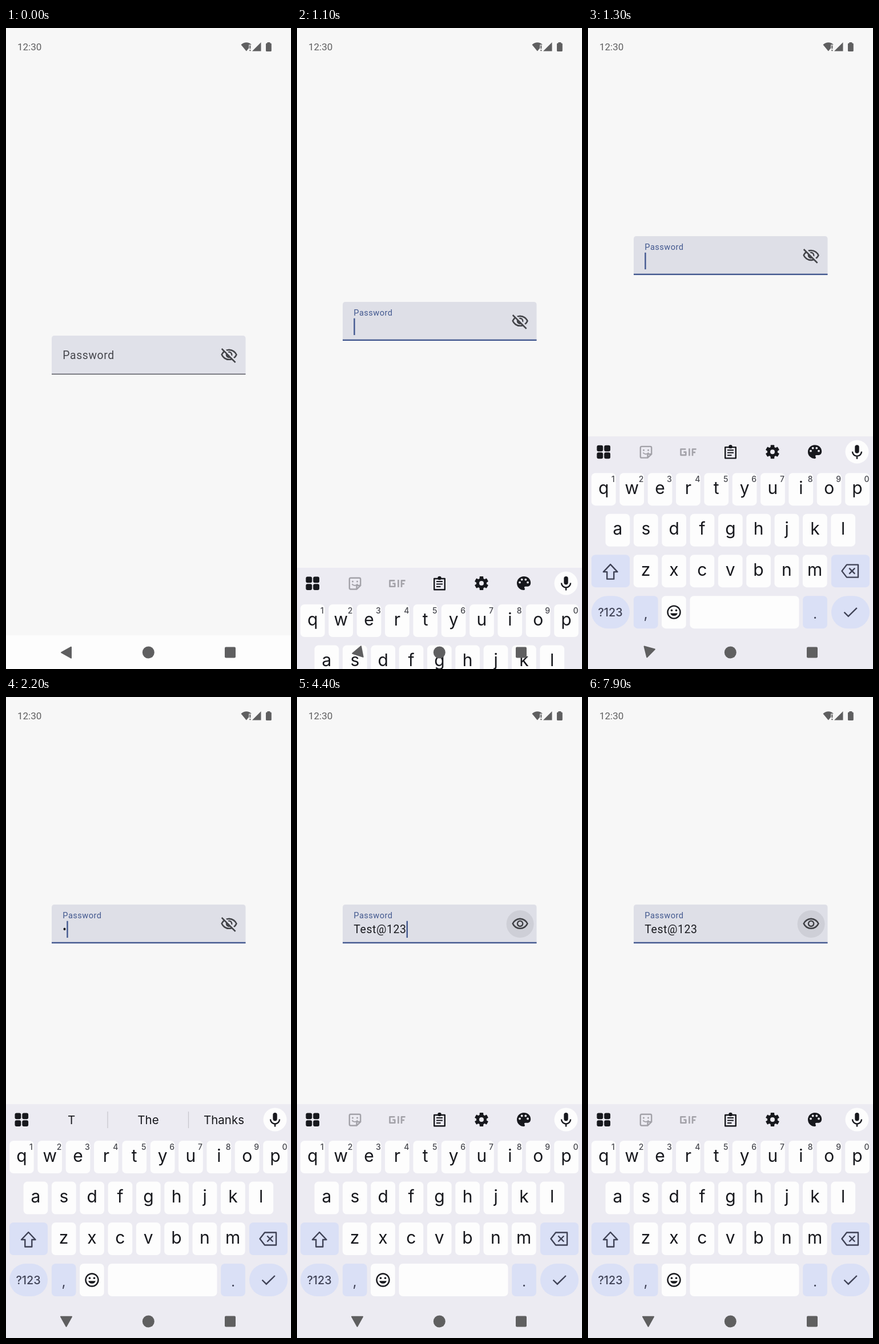
Recreate the animation shown at these times as an HTML page. Size 499 px wide and 1121 px high, loop 8000 ms.

```html
<!DOCTYPE html>
<html lang="en">
<head>
<meta charset="utf-8">
<title>Password field</title>
<style>
html, body { margin: 0; width: 100%; height: 100%; overflow: hidden; background: #f7f7f7; }
svg { display: block; width: 100%; height: 100%; font-family: Roboto, sans-serif; }
.mid { text-anchor: middle; }
.line { fill: none; stroke: currentColor; stroke-width: 2.4; }
.sys { fill: #5f5f60; }
.bg { fill: #ecebf2; }
#keyboard { font-family: Inter, sans-serif; }
#keys text { font-size: 30px; }
#keys .digit { font-size: 14px; font-weight: 500; fill: #45464d; }
</style>
</head>
<body>
<svg viewBox="0 0 499 1121">
  <rect width="499" height="1121" fill="#f7f7f7"/>
  <rect y="1062" width="499" height="59" fill="#fdfdfd"/>

  <g class="sys">
    <text x="20" y="38.5" font-size="17">12:30</text>
    <path d="M411.5 29.3C417 23.8 425 23.8 430 29.3H425.3V35.3L420.8 40.5Z"/>
    <path d="M426.4 30.5h2v5.8h-2zM426.4 38h2v2.2h-2zM431 40.5L446.5 25V40.5Z"/>
    <rect x="455" y="26.5" width="9.8" height="14.5" rx="1.6"/>
    <rect x="457.5" y="25" width="4.8" height="3"/>
  </g>

  <g id="field">
    <path id="box" d="M80 68V5q0-5 5-5H414.5q5 0 5 5V68Z"/>
    <rect id="rule" x="80" width="339.5"/>
    <text id="label" x="99.3">Password</text>
    <text id="value" x="99.3" y="50" font-size="19.4" letter-spacing=".607" fill="#1a1b20"></text>
    <rect id="cursor" y="28.7" width="2.4" height="29.3" fill="#42588f"/>
    <g transform="translate(390.6 34)" fill="#434449">
      <g transform="scale(.0325) translate(-480 480)">
        <path id="eye" fill-rule="evenodd" d="M480-320q75 0 127.5-52.5T660-500q0-75-52.5-127.5T480-680q-75 0-127.5 52.5T300-500q0 75 52.5 127.5T480-320Zm0-72q-45 0-76.5-31.5T372-500q0-45 31.5-76.5T480-608q45 0 76.5 31.5T588-500q0 45-31.5 76.5T480-392Zm0 192q-146 0-266-81.5T40-500q54-137 174-218.5T480-800q146 0 266 81.5T920-500q-54 137-174 218.5T480-200Zm0-80q113 0 207.5-59.5T832-500q-50-101-144.5-160.5T480-720q-113 0-207.5 59.5T128-500q50 101 144.5 160.5T480-280Z"/>
        <path id="eyeOff" d="m644-428-58-58q9-47-27-88t-93-32l-58-58q17-8 34.5-12t37.5-4q75 0 127.5 52.5T660-500q0 20-4 37.5T644-428Zm128 126-58-56q38-29 67.5-63.5T832-500q-50-101-143.5-160.5T480-720q-29 0-57 4t-55 12l-62-62q41-17 84-25.5t90-8.5q151 0 269 83.5T920-500q-23 59-60.5 109.5T772-302Zm20 246L624-222q-35 11-70.5 16.5T480-200q-151 0-269-83.5T40-500q21-53 53-98.5t73-81.5L56-792l56-56 736 736-56 56ZM222-624q-29 26-53 57t-41 67q50 101 143.5 160.5T480-280q20 0 39-2.5t39-5.5l-36-38q-11 3-21 4.5t-21 1.5q-75 0-127.5-52.5T300-500q0-11 1.5-21t4.5-21l-84-82Z"/>
      </g>
      <circle id="ripple" r="24" fill="#000"/>
    </g>
  </g>

  <g id="keyboard" color="#17181d" fill="#17181d">
    <rect class="bg" y="712" width="499" height="420"/>
    <g>
      <rect x="15.5" y="727.5" width="10.8" height="10.8" rx="3"/>
      <rect x="28.3" y="727.5" width="10.8" height="10.8" rx="3"/>
      <rect x="15.5" y="740.2" width="10.8" height="10.8" rx="3"/>
      <rect x="28.3" y="740.2" width="10.8" height="10.8" rx="3"/>
    </g>
    <g id="tools">
      <g color="#a3a2a9" fill="#a3a2a9">
        <path class="line" d="M94 729.7H109q2.2 0 2.2 2.2V743L104.5 749.5H94q-2.2 0-2.2-2.2V732q0-2.3 2.2-2.3ZM111 743h-6.5v6.5"/>
        <path class="line" d="M96.3 740.5q4.8 5 10 0" style="stroke-width:2"/>
        <circle cx="97.5" cy="736" r="1.5"/><circle cx="105.5" cy="736" r="1.5"/>
        <path class="line" style="stroke-width:2.6" stroke-linejoin="round" d="M171.3 734.3h-8.8v10.4h8.8v-5.2h-4M177.4 733v13M183 746V734.3h6.6M183 740h5"/>
      </g>
      <path class="line" d="M240.2 731H258.8V750.2H240.2Z" stroke-linejoin="round"/>
      <path class="line" d="M244 736h11M244 740.5h11M244 745h7.5" style="stroke-width:2"/>
      <circle cx="249.5" cy="730" r="3.2"/>
      <g transform="translate(323 739)">
        <circle r="9"/>
        <g id="teeth"></g>
        <circle class="bg" r="4"/>
      </g>
      <g transform="translate(397 739)">
        <path d="M0-12A12 12 0 0 0 0 12C2 12 2.4 10 1.5 8.7C.3 7 1.2 5.8 3 5.8H6C10 5.8 12.2 3 12.2-1C12-7.5 7-12 0-12Z"/>
        <g class="bg"><circle cx="-7" cy="-1.5" r="1.9"/><circle cx="-3.3" cy="-6.5" r="1.9"/><circle cx="3.3" cy="-6.5" r="1.9"/><circle cx="7" cy="-1.5" r="1.9"/></g>
      </g>
    </g>
    <g id="words" class="mid" font-size="20.5">
      <text x="114.5" y="747"></text><text x="249" y="747"></text><text x="381.5" y="747"></text>
      <path d="M178 725v29M319.5 725v29" stroke="#c6c5cc" stroke-width="1.2"/>
    </g>
    <circle cx="471" cy="739" r="20.5" fill="#fdfdfd"/>
    <rect x="467.3" y="727" width="7.4" height="14.5" rx="3.7"/>
    <path class="line" d="M463 738.5a8 8 0 0 0 16 0M471 746v5.5"/>

    <g id="keys" class="mid"></g>

    <g color="#3f4256" fill="#3f4256">
      <path class="line" d="M39.3 936L51.5 949H45.3V961.5H33.3V949H27Z" stroke-linejoin="round"/>
      <path class="line" d="M453 936.5H473V958.5H453L444.5 947.5ZM457.3 942.5l10 10M467.3 942.5l-10 10" stroke-linejoin="round"/>
      <path class="line" d="M448.5 1019.5l7.3 7.2 15-14.7"/>
      <text class="mid" x="39" y="1027" font-size="19.8" font-weight="500">?123</text>
      <text class="mid" x="101" y="1031" font-size="25">,</text>
      <text class="mid" x="397.5" y="1031" font-size="25">.</text>
    </g>
    <g transform="translate(150.5 1019.5)">
      <circle class="line" r="11"/>
      <circle cx="-4" cy="-3.2" r="1.8"/><circle cx="4" cy="-3.2" r="1.8"/>
      <path d="M-6.3 1.8H6.3A6.5 6 0 0 1-6.3 1.8Z"/>
    </g>
  </g>

  <g class="sys">
    <path id="back" d="M-8.5 0L8.5-9.5V9.5Z" stroke="#5f5f60" stroke-width="2" stroke-linejoin="round"/>
    <circle cx="249.3" cy="1092" r="10.5"/>
    <rect x="383" y="1082.5" width="19" height="19" rx="2"/>
  </g>
</svg>
<script>
const $ = id => document.getElementById(id);
const set = (id, attrs) => { for (const k in attrs) $(id).setAttribute(k, attrs[k]); };
const clamp = v => Math.min(1, Math.max(0, v));
const mix = (a, b, p) => a + (b - a) * p;
const show = (id, on) => { $(id).style.display = on ? '' : 'none'; };

// Keyboard
const PITCH = 49.35, KEY = 42.7, TINT = '#dae0f6';
const cap = (x, y, w = KEY, fill = '#fdfdfd', r = 7) =>
  `<rect x="${x}" y="${y}" width="${w}" height="57" rx="${r}" fill="${fill}"/>`;
let keys = '';
[['qwertyuiop', 6, 776], ['asdfghjkl', 30.6, 847.5], ['zxcvbnm', 79.8, 919]].forEach(([row, x0, y], r) =>
  [...row].forEach((ch, i) => {
    const x = x0 + i * PITCH;
    keys += cap(x, y) + `<text x="${x + KEY / 2}" y="${y + 36.8}">${ch}</text>`;
    if (!r) keys += `<text class="digit" x="${x + 37.8}" y="792">${(i + 1) % 10}</text>`;
  }));
for (const x of [6, 426]) keys += cap(x, 919, 67, TINT) + cap(x, 991, 67, TINT, 28.5);
for (const x of [79.8, 376.2]) keys += cap(x, 991, KEY, TINT);
$('keys').innerHTML = keys + cap(129, 991) + cap(178.5, 991, 191);
$('teeth').innerHTML = [0, 60, 120].map(a =>
  `<rect x="-3.3" y="-12" width="6.6" height="24" rx="1" transform="rotate(${a})"/>`).join('');

// Fast-out, slow-in: cubic-bezier(.4, 0, .2, 1)
function ease(x) {
  let lo = 0, hi = 1;
  for (let i = 0; i < 20; i++) {
    const s = (lo + hi) / 2, q = 1 - s;
    if (1.2 * q * q * s + 0.6 * q * s * s + s ** 3 < x) lo = s; else hi = s;
  }
  return lo * lo * (3 - 2 * lo);
}

const PASSWORD = 'Test@123';
const typedAt = [2100, 2300, 2400, 2500, 2900, 3200, 3300, 3400];
const toggledAt = [4200, 5900, 7600];
const hints = [[2500, 'Tests Test Testing'], [2400, 'Tes Test Yes'], [2300, 'Te The Ten'], [0, 'T The Thanks']];

function draw(t) {
  const focus = t >= 900;
  const rise = 409 * ease(clamp((t - 988.2) / 345));
  const top = 538 - Math.max(0, rise - 59) / 2;
  set('field', { transform: `translate(0 ${top})` });
  set('keyboard', { transform: `translate(0 ${409 - rise})` });
  show('keyboard', rise > 0);

  const turn = clamp((t - 1015) / 385);
  set('back', { transform: `translate(105.5 1092.2) rotate(${-90 * turn * turn * (3 - 2 * turn)})` });

  set('box', { fill: focus ? '#dedfe7' : '#e0e1e9' });
  set('rule', focus ? { y: 65.6, height: 2.4, fill: '#42588f' } : { y: 66.7, height: 1.3, fill: '#45464f' });
  const up = clamp((t - 850) / 150);
  set('label', {
    y: mix(40.8, 23.9, up), 'font-size': mix(19.4, 14.57, up),
    'letter-spacing': mix(0.607, 0.486, up), fill: focus ? '#42588f' : '#45464c'
  });

  const count = typedAt.filter(s => s <= t).length;
  const toggles = toggledAt.filter(s => s <= t);
  const open = toggles.length % 2 === 1;
  $('value').textContent = open ? PASSWORD : '•'.repeat(count);
  show('eye', open);
  show('eyeOff', !open);

  // The cursor blinks every 500 ms and restarts on each key
  const restart = count ? typedAt[count - 1] : 900;
  show('cursor', focus && Math.floor((t - restart) / 500) % 2 === 0);
  set('cursor', { x: open ? 191.6 : 99.2 + 7.06 * count });

  const held = t - toggles[toggles.length - 1];
  const alpha = toggles.length ? mix(0.07, 0.025, clamp((held - 400) / 100)) : 0;
  set('ripple', { 'fill-opacity': alpha });

  const hinting = t >= 2200 && t < 3000;
  show('tools', !hinting);
  show('words', hinting);
  const words = hints.find(h => h[0] <= t)[1].split(' ');
  $('words').querySelectorAll('text').forEach((el, i) => { el.textContent = words[i]; });
}

function tick() {
  draw(Math.floor(performance.now() % 8000 / 100) * 100);
  requestAnimationFrame(tick);
}
tick();
</script>
</body>
</html>
```
